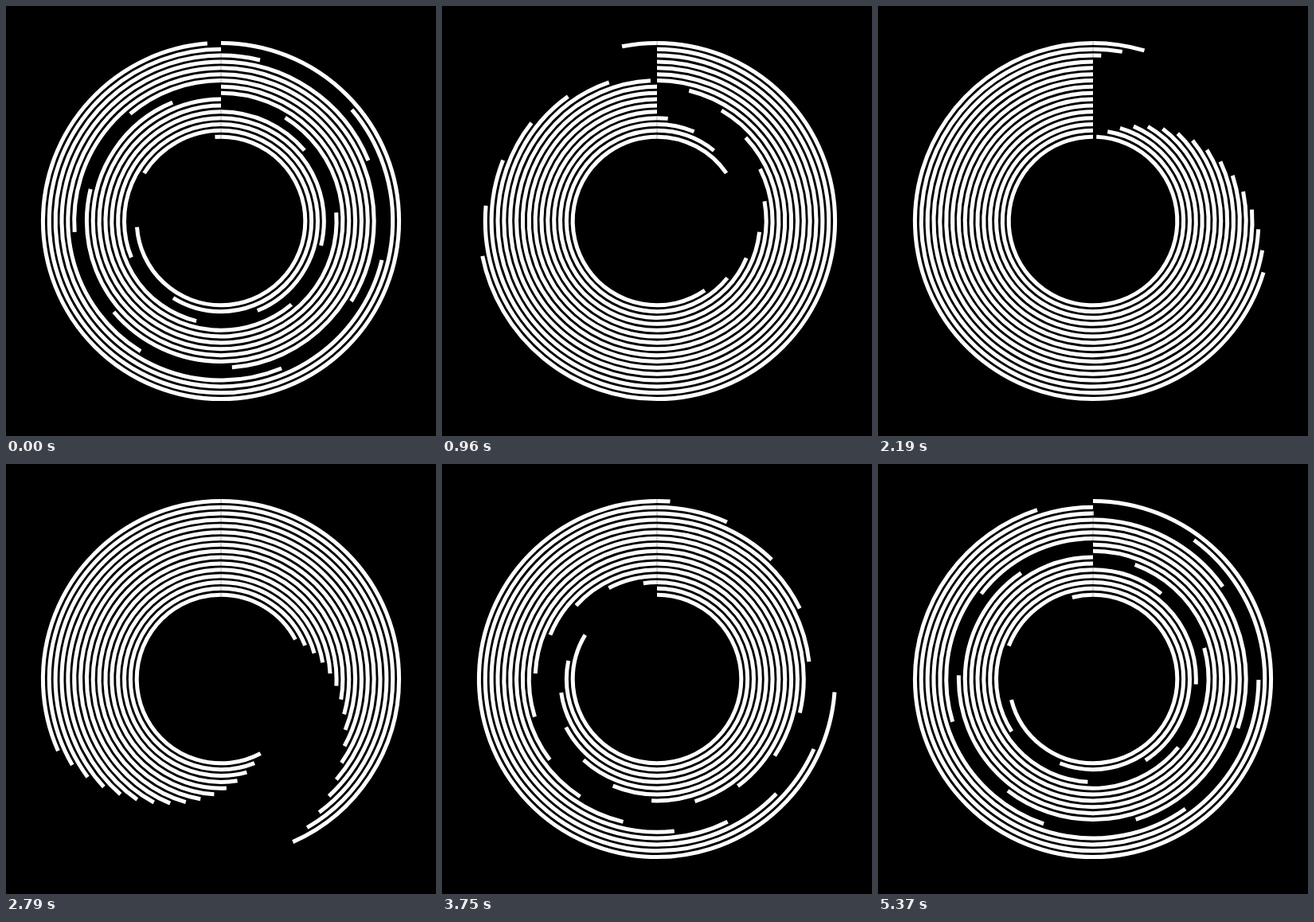
An HTML page with a canvas that plays this animation: 540x540 px, repeating every 5400 ms.

```html
<!DOCTYPE html>
<html lang="en">
<head>
<meta charset="utf-8">
<title>Rings</title>
<style>
  html, body { margin: 0; width: 100%; height: 100%; overflow: hidden; background: #000; }
  canvas { display: block; width: 100vmin; height: 100vmin; }
</style>
</head>
<body>
<canvas id="stage" width="540" height="540"></canvas>
<script>
const ctx = document.getElementById('stage').getContext('2d');
const LOOP = 5400, STEP = 30;
const CENTER = 270, RINGS = 16, OUTER = 223.6, INNER = 105.8, WEIGHT = 5;
const GAP = 90, CYCLE = 360 + GAP;

// Angle between neighbouring rings: [time ms, degrees, degrees per ms]
const SPREAD = [
  [0, 54.02, -0.009],
  [960, 16.45, -0.035],
  [1590, -0.72, -0.0185],
  [2500, -7.5, 0],
  [2790, -6.28, 0.0095],
  [3750, 19.82, 0.038],
  [4650, 49.15, 0.0228],
  [5220, 54.8, 0],
  [5400, 54.02, -0.009]
];

const mod = (a, n) => ((a % n) + n) % n;

function spreadAt(t) {
  const i = SPREAD.findIndex(k => k[0] > t);
  const [t0, a, va] = SPREAD[i - 1];
  const [t1, b, vb] = SPREAD[i];
  const d = t1 - t0, u = (t - t0) / d, w = 1 - u;
  return w * w * (1 + 2 * u) * a + u * u * (3 - 2 * u) * b
    + d * u * w * (w * va - u * vb);
}

function arc(radius, from, to) {
  if (to - from < 0.01) return;
  const rad = deg => (deg - 90) * Math.PI / 180;
  ctx.beginPath();
  ctx.arc(CENTER, CENTER, radius, rad(from), rad(to));
  ctx.stroke();
}

function draw(t) {
  const spread = spreadAt(t);
  const innerGap = 265.9 + 0.2495 * t;

  ctx.fillStyle = '#000';
  ctx.fillRect(0, 0, 540, 540);
  ctx.strokeStyle = '#fff';
  ctx.lineWidth = WEIGHT;

  for (let i = 0; i < RINGS; i++) {
    const radius = OUTER + (INNER - OUTER) * i / (RINGS - 1);
    const angle = innerGap - (RINGS - 1 - i) * spread;
    // The gap enters and leaves at twelve o'clock instead of wrapping
    const start = mod(angle + GAP, CYCLE) - GAP;
    const end = start + GAP;
    arc(radius, 0, Math.max(0, start));
    arc(radius, Math.min(360, end), 360);

    if (start > 0 && end < 360) {
      ctx.fillStyle = 'rgba(0, 0, 0, 0.3)';
      ctx.fillRect(CENTER - 0.5, CENTER - radius - WEIGHT / 2, 1, WEIGHT);
    }
  }
}

const begin = performance.now();
function tick() {
  const t = (performance.now() - begin) % LOOP;
  draw(Math.floor(t / STEP) * STEP);
  requestAnimationFrame(tick);
}
tick();
</script>
</body>
</html>
```
